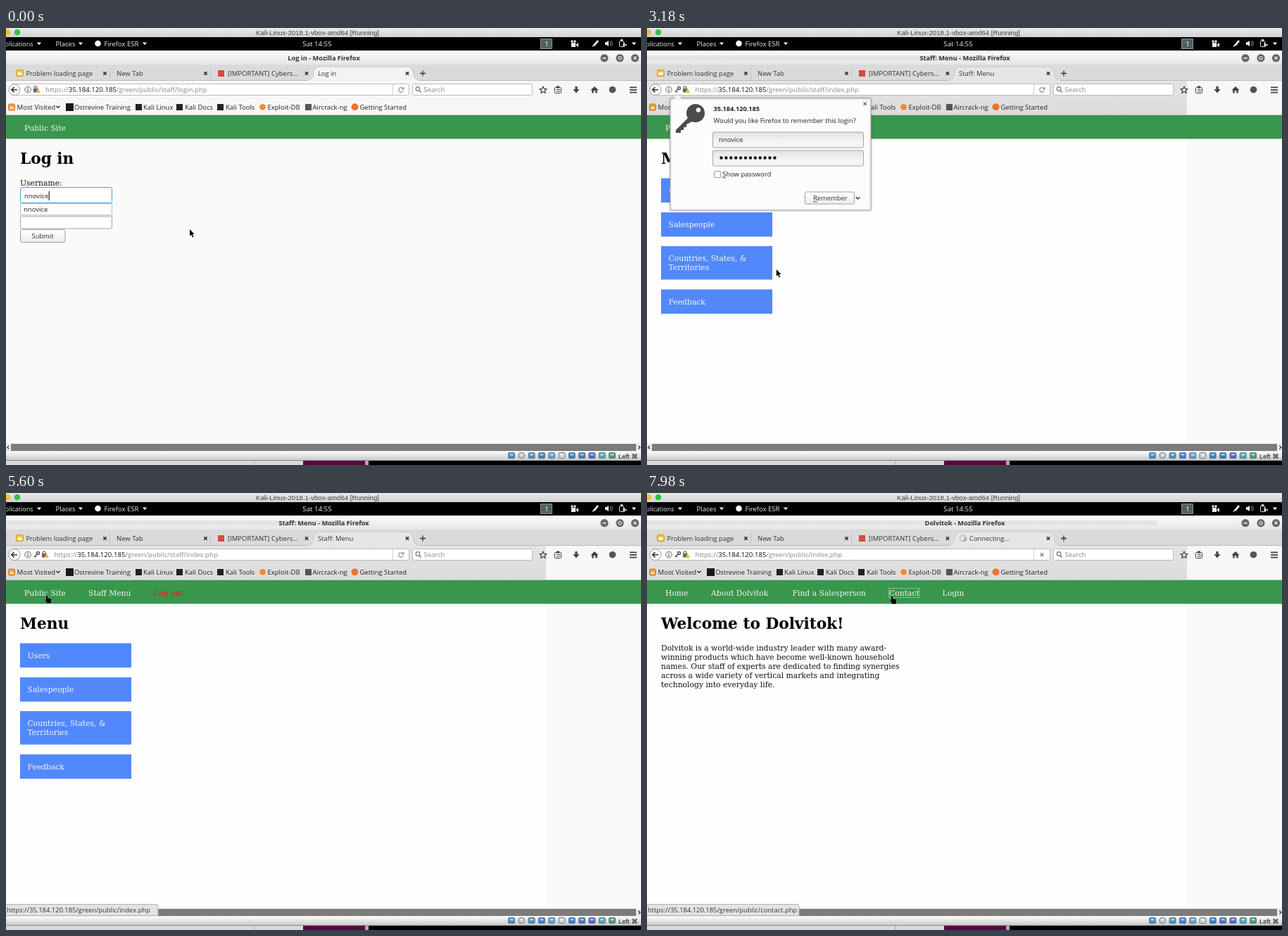
These frames come from a looping animation (902x621 px, 8 s). An HTML page with a canvas:

```html
<!DOCTYPE html>
<html lang="en">
<head>
<meta charset="utf-8">
<title>Browser session</title>
<style>
html, body { margin: 0; width: 100%; height: 100%; overflow: hidden; }
canvas { display: block; }
</style>
</head>
<body>
<canvas id="stage" width="902" height="621"></canvas>
<script>
const ctx = document.getElementById('stage').getContext('2d');
const UI = '"Open Sans", sans-serif', SERIF = '"DejaVu Serif", serif', MAC = '"Liberation Sans", sans-serif';
const LOOP = 8000, USER = 'nnovice', FIRM = 'Dolvitok', HOST = '35.184.120.185';

// Screen refreshes: [first, last, count]
const beats = [[150, 1080, 7], [1230, 1520, 3], [1820, 2850, 8], [3000, 3930, 6], [4080, 5000, 7],
  [5150, 6040, 7], [6250, 6730, 4], [7020, 7530, 4], [7980, 7980, 1]];
// Pointer path: [time, x, y]
const path = [[0, 261, 286], [900, 65, 271], [1080, 65, 271], [1230, 120, 317], [1520, 101, 335],
  [1820, 101, 335], [2700, 153, 402], [3000, 153, 402], [3930, 307, 107], [4080, 300, 120],
  [4846, 142, 249], [5000, 110, 215], [5400, 57, 146], [5760, 57, 146], [6250, 302, 297],
  [6730, 328, 225], [7020, 334, 205], [7530, 347, 147]];

function refreshTime(t) {
  let now = 0;
  for (const [a, b, n] of beats) if (t >= a) {
    const step = (b - a) / (n - 1) || 1;
    now = a + step * Math.min(n - 1, Math.floor((t - a) / step + 0.05));
  }
  return now;
}
function pointerAt(t) {
  const i = path.findIndex(p => p[0] > t);
  if (i < 0) return path[path.length - 1].slice(1);
  const [a, x, y] = path[i - 1], [b, u, v] = path[i], k = (t - a) / (b - a);
  return [x + (u - x) * k, y + (v - y) * k];
}

// Drawing helpers
function rect(x, y, w, h, fill) { ctx.fillStyle = fill; ctx.fillRect(x, y, w, h); }
function box(x, y, w, h, fill, stroke, r = 0) {
  ctx.beginPath(); ctx.roundRect(x, y, w, h, r);
  if (fill) { ctx.fillStyle = fill; ctx.fill(); }
  if (stroke) { ctx.strokeStyle = stroke; ctx.lineWidth = 1; ctx.stroke(); }
}
function disc(x, y, r, fill, stroke, width = 1) {
  ctx.beginPath(); ctx.arc(x, y, r, 0, 7);
  if (fill) { ctx.fillStyle = fill; ctx.fill(); }
  if (stroke) { ctx.strokeStyle = stroke; ctx.lineWidth = width; ctx.stroke(); }
}
function shape(x, y, d, fill, stroke, width = 1) {
  const p = new Path2D(d);
  ctx.save(); ctx.translate(x, y); ctx.lineJoin = 'round';
  if (stroke) { ctx.strokeStyle = stroke; ctx.lineWidth = width; ctx.stroke(p); }
  if (fill) { ctx.fillStyle = fill; ctx.fill(p); }
  ctx.restore();
}
function fade(y, h, a, b) {
  const g = ctx.createLinearGradient(0, y, 0, y + h);
  g.addColorStop(0, a); g.addColorStop(1, b);
  return g;
}
function text(s, x, y, color = '#222', size = 9.5, family = UI, weight = 400, align = 'left') {
  ctx.font = `${weight} ${size}px ${family}`;
  ctx.textAlign = align; ctx.fillStyle = color;
  ctx.fillText(s, x, y);
}
function keyed(s, key, x, y, color, size = 9.5) {
  text(s, x, y, color, size);
  const at = s.indexOf(key), left = ctx.measureText(s.slice(0, at)).width;
  rect(x + left, y + 1.4, ctx.measureText(key).width, 0.8, color);
}
const serif = (s, x, y, color = '#111') => text(s, x, y, color, 10.78, SERIF);
const heading = s => text(s, 20, 193, '#000', 21.67, SERIF, 700);
const cross = (x, y, r, color, w = 1.4) => shape(x, y, `M${-r} ${-r}L${r} ${r}M${r} ${-r}L${-r} ${r}`, null, color, w);
const down = (x, y, color) => shape(x, y, 'M-3.2 -1.5H3.2L0 2.2Z', color);
const chevron = (x, y) => shape(x, y, 'M-2.6 -1.3L0 1.4L2.6 -1.3', null, '#222', 1.3);
const dots = (x, y) => { for (let i = 0; i < 12; i++) disc(x + i * 6.9, y, 2.2, '#111'); };

function field(x, y, w, focus, plain) {
  box(x + 0.5, y + 0.5, w - 1, 22, plain ? '#fff' : fade(y, 14, '#e2e2e2', '#f4f4f4'), focus ? '#43a3dc' : '#a5a5a5', 2);
}
function button(x, y, w, h) { box(x + 0.5, y + 0.5, w - 1, h - 1, fade(y, h, '#fff', '#ececec'), '#a0a0a0', 2); }

function desktop() {
  rect(0, 0, 902, 621, '#fafafa');
  rect(0, 0, 902, 13, fade(0, 13, '#e9e9e9', '#d2d2d2'));
  disc(2, 6, 4.3, '#f8bd31'); disc(16, 6, 4.3, '#29c63f');
  text('Kali-Linux-2018.1-vbox-amd64 [Running]', 442.5, 9.6, '#444', 9.63, MAC, 400, 'center');

  rect(0, 13, 902, 19, '#000');
  text('plications', -1.5, 26, '#eee', 9);
  text('Places', 70.5, 26, '#eee', 9.6);
  disc(130.5, 22, 4.3, '#fff');
  text('Firefox ESR', 139.5, 26, '#eee', 9.5);
  text('Sat 14:55', 442, 26, '#eee', 9.7, UI, 400, 'center');
  for (const x of [47, 106, 197, 892]) down(x, 22, '#eee');
  box(759.5, 15.5, 16, 14, '#536063', '#8b9496');
  text('1', 768, 26, '#fff', 9.5, UI, 400, 'center');
  rect(803, 21, 6, 6, '#eee'); shape(809, 24, 'M0 0L4 -3V3Z', '#eee');
  disc(804, 19, 1.7, '#eee'); disc(808, 19, 1.7, '#eee');
  shape(837, 22, 'M-5 5L-2 1L3 -5L5 -3L0 3Z', '#eee');
  shape(856, 22, 'M-5 -2H-3L0 -4V4L-3 2H-5Z', '#eee');
  shape(857, 22, 'M1 -3Q3 0 1 3M3 -4Q6 0 3 4', null, '#888');
  box(871.5, 18.5, 6, 8, null, '#eee', 1); rect(873, 16, 3, 2, '#eee');
  shape(878, 24, 'M0 -3V3M-2 0H4', null, '#eee', 1.5);
}

function chrome(now, title, tab, url, loading) {
  const loggedIn = now > 2990;
  rect(0, 32, 902, 20, fade(32, 20, '#fbfbfb', '#e6e6e6'));
  if (loggedIn) rect(0, 39, now < 6240 ? 517 : 724, 7, '#e4e4e4');
  text(title + ' - Mozilla Firefox', 451.5, 46, '#333', 9.25, UI, 700, 'center');
  for (const x of [850, 872, 893.5]) disc(x, 42.7, 5.6, '#686868');
  rect(847.5, 42, 5, 1.4, '#fff'); disc(872, 42.7, 2.2, null, '#fff'); cross(893.5, 42.7, 2, '#fff', 1.2);

  rect(0, 52, 902, 23, '#dadada');
  rect(0, 74, 902, 1, '#b9b9b9');
  shape(0, 0, 'M428 75Q436 74 437 65Q438 55.5 446 55.5H569Q577 55.5 578 65Q579 74 588 75Z', loggedIn ? '#e6e6e6' : '#f3f3f3', '#b5b5b5', 0.8);
  rect(147, 57, 1, 15, '#c2c2c2'); rect(290, 57, 1, 15, '#c2c2c2');
  box(14.5, 59.5, 10, 9, '#f5c04a', '#d79a20', 1.5); rect(16.5, 63, 6, 4, '#fff6d8');
  text('Problem loading page', 28.5, 68, '#333', 9.3);
  text('New Tab', 157, 68, '#333', 9.5);
  rect(301, 60, 9, 9, '#d8483e');
  text('[IMPORTANT] Cybers...', 315, 68, '#333', 9.5);
  if (loading) {
    disc(448.5, 64.5, 4, null, '#c9c9c9', 2);
    const a = now / 160;
    ctx.beginPath(); ctx.arc(448.5, 64.5, 4, a, a + 1.6);
    ctx.strokeStyle = '#8d8d8d'; ctx.stroke();
  }
  text(loading ? 'Connecting…' : tab, loading ? 458 : 443, 68, '#333', 9.4);
  for (const x of [140.5, 283.5, 427, 570]) cross(x, 64.5, 2.1, '#333', 1.5);
  shape(592, 64.5, 'M-4 0H4M0 -4V4', null, '#333', 1.3);

  rect(0, 75, 902, 48, '#f7f7f7');
  if (loggedIn) rect(0, 75, 767, 48, fade(75, 48, '#e4e4e4', '#dcdcdc'));
  box(8.5, 79.5, 564, 16, '#fff', '#bcbcbc', 2);
  disc(12, 87.7, 8, '#fbfbfb', '#9c9c9c');
  shape(12, 87.7, 'M4 0H-4M-0.5 -3.7L-4.2 0L-0.5 3.7', null, '#333', 1.6);
  disc(31, 87.7, 4.3, null, '#666'); rect(30.4, 87, 1.3, 3.3, '#555'); rect(30.4, 85, 1.3, 1.2, '#555');
  const lock = loggedIn ? 55 : 43;
  if (loggedIn) { disc(45.5, 85.5, 1.9, null, '#555', 1.5); shape(44, 87, 'M0 0L-4 4M-2.5 2.5L-1 4', null, '#555', 1.6); }
  shape(lock - 1, 86, 'M-2 0V-1.5Q0 -4.5 2 -1.5V0', null, '#666', 1.3); rect(lock - 4, 86, 6, 5.5, '#666');
  shape(lock + 2.5, 89.5, 'M0 -4L3.3 2.4H-3.3Z', '#efb82c');
  let x = loggedIn ? 68.5 : 56;
  for (const [part, color] of [['https://', '#888'], [HOST, '#111'], [url, '#888']]) {
    text(part, x, 91.3, color, 9.62);
    x += ctx.measureText(part).width;
  }
  rect(549, 80, 1, 15, '#cfcfcf');
  if (loading) cross(561, 87.7, 2.3, '#777', 1.3);
  else shape(561, 87.7, 'M3 -1.5A3.3 3.3 0 1 0 3.2 1.2M3.8 -4V-1H0.8', null, '#888', 1.1);
  box(577.5, 79.5, 170, 16, '#fff', '#bcbcbc', 2);
  disc(585, 86.5, 2.8, null, '#777', 1.2); shape(587, 88.6, 'M0 0L2.6 2.8', null, '#777', 1.4);
  text('Search', 593.5, 91.3, '#888', 9.5);
  shape(763, 88, 'M0 -5L1.5 -1.6L5 -1.3L2.3 1L3.2 4.6L0 2.6L-3.2 4.6L-2.3 1L-5 -1.3L-1.5 -1.6Z', null, '#444', 1.2);
  box(779.5, 84.5, 9, 8, null, '#444', 1); rect(782, 82.5, 4, 3, '#444'); rect(782, 87, 5, 1, '#444'); rect(782, 89.5, 5, 1, '#444');
  shape(810, 88, 'M-1.6 -5H1.6V-1H4.6L0 4.5L-4.6 -1H-1.6Z', '#444');
  shape(836, 88, 'M0 -5L5.5 0.2H3.8V4.5H1.3V1H-1.3V4.5H-3.8V0.2H-5.5Z', '#444');
  disc(861.5, 87.7, 4.8, '#555');
  for (let i = 0; i < 3; i++) rect(886, 83.5 + i * 3.6, 10, 1.8, '#444');

  box(3.5, 108, 9, 9, '#eda044', '#c9792b', 1.5); rect(5.5, 112, 5, 3, '#fbe0bb');
  text('Most Visited', 15.5, 116, '#222', 9.6); chevron(74, 112);
  rect(85, 107, 11, 11, '#1d1717');
  text('Ostrevine Training', 97, 116, '#222', 9.45);
  [['Kali Linux', 183, 195], ['Kali Docs', 241, 254], ['Kali Tools', 299, 312]].forEach(([name, i, at]) => {
    rect(i + 1, 108, 9, 9, '#222'); text(name, at, 116, '#222', 9.5);
  });
  disc(364.5, 112.3, 4.3, '#f08a2a'); text('Exploit-DB', 371.5, 116, '#222', 9.5);
  rect(425, 108, 9, 9, '#555'); text('Aircrack-ng', 435.5, 116, '#222', 9.5);
  disc(495.5, 112.3, 5, '#e8762c'); text('Getting Started', 502.5, 116, '#222', 9.42);
  rect(0, 123, 902, 1, '#c4c4c4');
}

function frameBottom() {
  rect(0, 590, 902, 12, '#ededed'); rect(7, 591, 888, 10, '#7b7c7b');
  shape(3, 596, 'M1.2 -2.4L-1.2 0L1.2 2.4', null, '#222', 1.1);
  shape(899.5, 596, 'M-1.2 -2.4L1.2 0L-1.2 2.4', null, '#222', 1.1);
  rect(0, 602, 902, 13, fade(602, 13, '#fbfbfb', '#c6c6c6'));
  const tints = ['#3c8fd0', '#c4c8cb', '#4f8fc0', '#3a7fcf', '#5aa0d8', '#cdd0d3', '#2f7fd6', '#3b78c4', '#5262cc', '#4da8b4', '#43a35c'];
  tints.forEach((c, i) => {
    const x = 713.5 + i * 14.3;
    box(x, 603.5, 9, 8, c, '#67798b', i === 1 ? 4 : 1.5);
    rect(x + 2, 605, 5, 2.5, 'rgba(255,255,255,.6)');
  });
  text('Left ⌘', 870, 611.7, '#111', 9.4, MAC);
  rect(0, 615, 422, 6, '#d9d9d9'); rect(0, 614, 902, 1, '#8d8d8d'); rect(352, 615, 1, 6, '#b0b0b0');
  rect(422, 615, 88, 6, '#58063f'); rect(510, 615, 5, 6, '#aaa'); rect(515, 615, 387, 6, '#000');
}

function loginPage(now) {
  const typing = now < 140, pasted = now > 1810, submitFocus = now > 2390;
  if (!typing) rect(20, 226, 704, 364, '#fefefe');
  serif('Public Site', 26, 145.5, '#eef6ef');
  heading('Log in');
  serif('Username:', 20, 223.5);
  field(20, 226, 131, typing, typing);
  text(USER, 26, 241.5, '#222', 9.5);
  const caret = 26.5 + ctx.measureText(USER).width;
  serif('Password:', 20, 260);
  field(20, 262.5, 131, !typing && !submitFocus, typing);
  button(20, 286, 64.5, 19);
  if (submitFocus) box(22.5, 288.5, 59, 13.5, null, '#b9b9b9', 1);
  text('Submit', 52, 298.7, '#333', 9.36, UI, 400, 'center');
  if (typing) {
    rect(caret, 232, 1, 13, '#000');
    rect(20, 250, 131, 18, '#fafafa');
    box(20.5, 249.5, 130, 16, '#fdfdfd', '#bdbdbd');
    box(20.5, 265, 130, 4, '#d4d4d4', null, [0, 0, 3, 3]);
    text(USER, 25, 260.7, '#222', 9.5);
  } else if (pasted) {
    dots(28.7, 274);
    if (!submitFocus) rect(109, 268, 1, 13, '#000');
  } else rect(26, 268, 1, 13, '#000');
}

function contextMenu(now) {
  box(65.5, 271.5, 120, 155, '#fcfcfc', '#9a9a9a');
  for (const y of [290, 367, 387, 407]) rect(66, y, 119, 1, '#666');
  const picked = now < 1220 ? -1 : now < 1370 ? 1 : now < 1510 ? 2 : 3;
  if (picked > 0) rect(66, 272 + picked * 19, 119, 19, '#2199d6');
  [['Undo', 'U', 284.5, 1], ['Cut', 't', 304], ['Copy', 'C', 323.5], ['Paste', 'P', 342.5], ['Delete', 'D', 361.5, 1],
    ['Select All', 'A', 381, 1], ['Fill Password', 'F', 400.7], ['Inspect Element (Q)', 'Q', 420.5]].forEach(([s, key, y, off], i) =>
    keyed(s, key, 83.5, y, i === picked ? '#fff' : off ? '#999' : '#333', 9.6));
  shape(178, 397, 'M-1.3 -2.6L1.4 0L-1.3 2.6', null, '#333', 1.2);
}

function menuPage(now) {
  serif('Public Site', 26, 145.5, '#eef6ef');
  serif('Staff Menu', 117, 145.5, '#eef6ef');
  serif('Log out', 210, 145.5, '#f5180c');
  heading('Menu');
  const hover = now > 4680 && now < 5290;
  [[213.5, 34.5, 'Users'], [262, 34.5, 'Salespeople'], [310, 47.5, 'Countries, States, &', 'Territories'], [371.5, 34.5, 'Feedback']]
    .forEach(([y, h, ...lines], i) => {
      rect(20, y, 158, h, hover && !i ? '#457ae4' : '#5188fc');
      lines.forEach((s, k) => serif(s, 30.5, y + 21 + k * 13, '#f2f6ff'));
    });
}

function loginPrompt(now) {
  ctx.save();
  ctx.shadowColor = 'rgba(0,0,0,.25)'; ctx.shadowBlur = 3;
  box(33, 100, 285, 159, '#fcfcfc', '#aaa', 1);
  ctx.restore();
  shape(43.5, 100.5, 'M-6 0L0 -6L6 0', '#fcfcfc', '#aaa', 0.8);
  shape(0, 0, 'M62 124L41 145V149H48V145H52V141H56V137L68 131Z', '#4b4b4b');
  disc(69, 121, 13, '#4b4b4b'); disc(73, 116.5, 3.2, '#fcfcfc');
  text(HOST, 94.5, 117.7, '#222', 9.2, UI, 700);
  text('Would you like Firefox to remember this login?', 94.5, 135, '#222', 9.39);
  field(93, 147.5, 215, false); text(USER, 102, 162, '#222', 9.5);
  field(93, 173.5, 215, false); dots(105.5, 184.5);
  box(95.5, 203.5, 9, 9, '#fff', '#999', 1);
  keyed('Show password', 'S', 107, 211, '#222', 9.5);
  button(224, 232.5, 71, 18);
  keyed('Remember', 'R', 236, 245, '#333', 9.4);
  chevron(299.5, 241.5);
  const hot = now > 3900;
  if (hot) box(305.5, 103.5, 8.5, 8.5, '#d8412f', null, 1);
  cross(309.7, 107.7, 2.2, hot ? '#fff' : '#666', 1.3);
}

function homePage(focus) {
  [['Home', 26], ['About ' + FIRM, 91], ['Find a Salesperson', 206.5], ['Contact', 344], ['Login', 419.5]]
    .forEach(([s, x]) => serif(s, x, 145.5, '#eef6ef'));
  if (focus) {
    ctx.setLineDash([1, 1]);
    box(343.5, 135.5, 43.5, 13, null, '#d7e8da');
    ctx.setLineDash([]);
  }
  heading(`Welcome to ${FIRM}!`);
  [FIRM + ' is a world-wide industry leader with many award-',
    'winning products which have become well-known household',
    'names. Our staff of experts are dedicated to finding synergies',
    'across a wide variety of vertical markets and integrating',
    'technology into everyday life.'].forEach((s, i) => serif(s, 20, 223.5 + i * 13));
}

function linkStatus(file) {
  box(-2, 584.5, 218, 16, '#e3e3e3', '#b0b0b0', [0, 3, 0, 0]);
  text(`https://${HOST}/green/public/${file}`, 1, 596, '#333', 9.4);
}

function pointer(x, y, hand) {
  if (hand) shape(x, y, 'M0 0Q1.3 -1 2 0.5V3.5Q6.5 3 7 5V8Q6.5 10 6 10.5H1.5Q-0.5 8 -1.5 5.5L0 5Z', '#000', '#999', 0.8);
  else shape(x, y, 'M0 0V9.7L2.2 7.7L3.9 11.5L5.5 10.7L3.8 7.1H6.8Z', '#000', '#fff', 1.2);
}

function draw(t) {
  const now = refreshTime(t);
  const page = now < 2990 ? 'login' : now < 6240 ? 'menu' : 'home';
  const loading = (now > 2840 && now < 2990) || (now > 5880 && now < 6240) || now > 7970;
  const [title, url] = { login: ['Log in', 'staff/login.php'], menu: ['Staff: Menu', 'staff/index.php'], home: [FIRM, 'index.php'] }[page];
  desktop();
  chrome(now, title, title, '/green/public/' + url, loading);
  rect(0, 124, 902, 33.5, '#3a954d');
  if (page !== 'login') rect(0, 158, 767, 432, '#fefefe');
  if (page === 'login') loginPage(now);
  else if (page === 'menu') menuPage(now);
  else homePage(now > 7970);
  frameBottom();
  if (now > 1070 && now < 1810) contextMenu(now);
  if (now > 3180 && now < 4070) loginPrompt(now);
  const onPublic = now > 5430 && now < 5880, onContact = now > 7500;
  if (onPublic) linkStatus('index.php');
  if (onContact) linkStatus('contact.php');
  pointer(...pointerAt(now), onPublic || onContact);
}

function tick() {
  draw(performance.now() % LOOP);
  requestAnimationFrame(tick);
}
tick();
</script>
</body>
</html>
```
